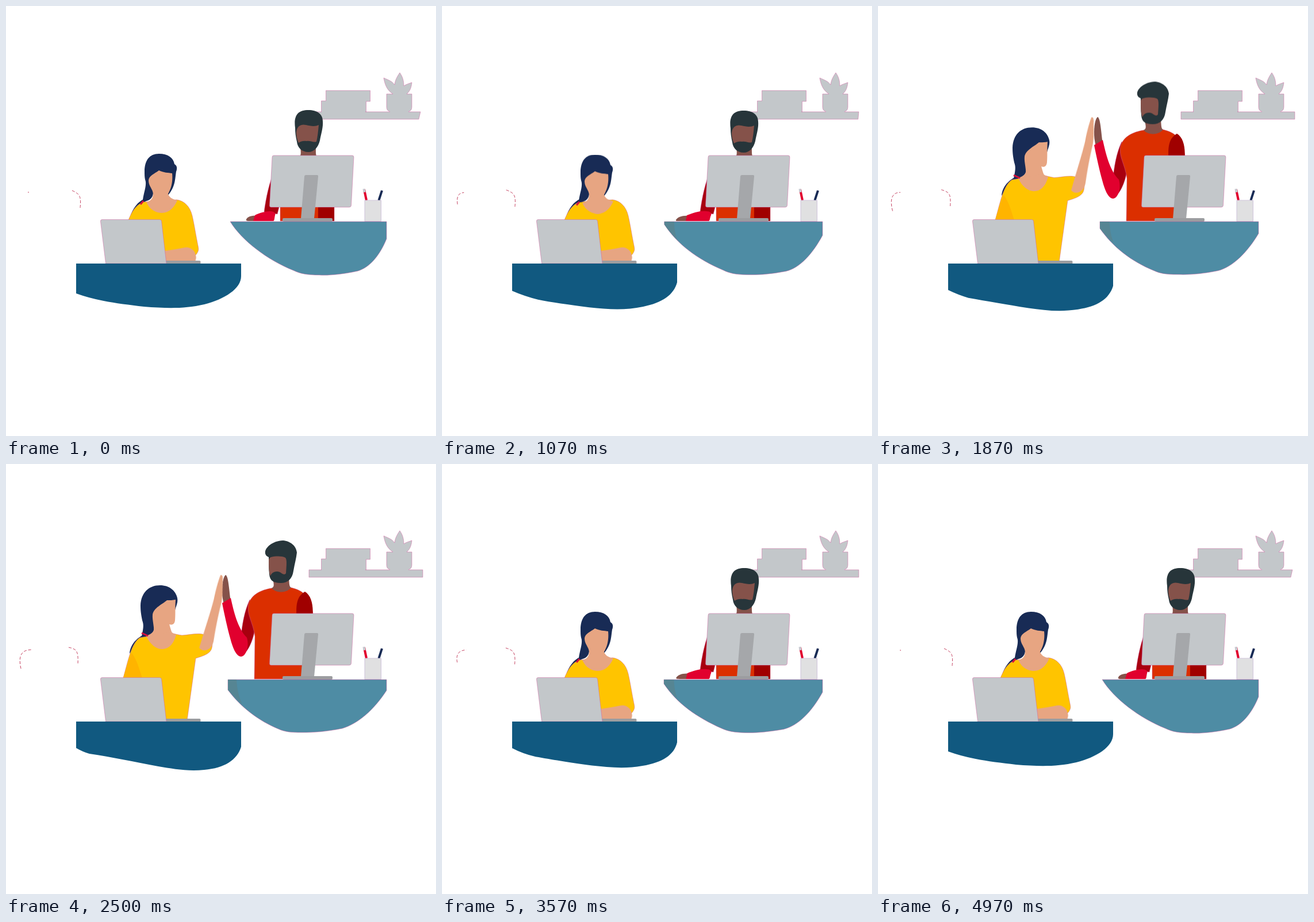
Write an HTML page that moves like this. It is 748 px wide and 748 px high and loops after 5010 ms.

```html
<!DOCTYPE html>
<html lang="en">
<head>
<meta charset="utf-8">
<title>High five at the desk</title>
<style>
html, body { margin: 0; width: 100%; height: 100%; overflow: hidden; background: #fff; }
svg { display: block; width: 100vw; height: 100vh; }

.grey { fill: #c3c7ca; }
.dark { fill: #9c9da0; }
.rim { stroke: #cf5f9f; stroke-width: .5; }
.dash { fill: none; stroke: #c4405f; stroke-width: 1; stroke-dasharray: 5 3; }
.skin { fill: #e7a582; }
.brown { fill: #85524a; }
.navy { fill: #182b55; }
.coal { fill: #27353a; }
.red { fill: #e1002e; }

/* Each shape carries its poses as --a (rest) to --f; the groups share one timeline. */
.blob path, .man path, .woman path { animation: 5010ms linear infinite; }
.blob path { animation-name: blob; }
.man path { animation-name: man; }
.woman path { animation-name: woman; }
#forearm { animation-name: forearm; }
#manHead { animation: manNod 5010ms ease-in-out infinite; }
#womanHead { animation: womanNod 5010ms ease-in-out infinite; }

@keyframes blob {
  0%, 99.2%, 100% { d: var(--a); }
  9.4% { d: var(--b); }
  29.3% { d: var(--c); }
  49.9% { d: var(--d); }
  62.5% { d: var(--e); }
  83.2% { d: var(--f); }
}
@keyframes man {
  0%, 99.2%, 100% { d: var(--a); }
  9.4% { d: var(--b, var(--a)); }
  21.8% { d: var(--b, var(--a)); animation-timing-function: ease-in; }
  29.3% { d: var(--c); animation-timing-function: ease-out; }
  37% { d: var(--d); }
  51% { d: var(--d); animation-timing-function: ease-in-out; }
  62.5% { d: var(--e, var(--a)); }
  72%, 83.2% { d: var(--b, var(--a)); }
}
@keyframes woman {
  0%, 71%, 100% { d: var(--a); }
  22.2% { d: var(--a); animation-timing-function: ease-in; }
  29.3% { d: var(--c); animation-timing-function: ease-out; }
  38% { d: var(--d); }
  52% { d: var(--d); animation-timing-function: ease-in; }
  62.5% { d: var(--e); animation-timing-function: ease-out; }
}
@keyframes forearm {
  0%, 71%, 100% { transform: translate(327px, 430px) rotate(-98deg) scale(1.2, .9); }
  22.2% { transform: translate(327px, 430px) rotate(-98deg) scale(1.2, .9); animation-timing-function: ease-in; }
  29.3% { transform: translate(344px, 378px) rotate(-72deg) scale(1.25, .8); animation-timing-function: ease-out; }
  38% { transform: translate(348px, 322px) rotate(11.5deg) scale(1, 1); }
  52% { transform: translate(348px, 322px) rotate(11.5deg) scale(1, 1); animation-timing-function: ease-in; }
  62.5% { transform: translate(342px, 382px) rotate(-57deg) scale(1.2, .78); animation-timing-function: ease-out; }
}
@keyframes manNod {
  0%, 29.3%, 49.9%, 67%, 99.2%, 100% { transform: none; }
  9.4%, 21.8% { transform: translate(-1px, 1px); }
  42% { transform: translateY(-2px); }
  62.5% { transform: translateY(-3px); }
}
@keyframes womanNod {
  0%, 29.3%, 71%, 99.2%, 100% { transform: none; }
  9.4%, 21.8% { transform: translateY(1.5px); }
  83.2% { transform: translateY(1px); }
}

#shelf {
  --a: path("M527 184 L721 184 L718 197 L527 197 Z");
  --b: path("M527 184 L725 184 L722 197 L527 197 Z");
  --c: path("M527 184 L725 184 L725 197 L527 197 Z");
  --d: var(--c); --e: var(--c); --f: var(--c);
}
#dashL {
  --a: path("M38 324 C39 324 39 324 40 324");
  --b: path("M30 327 C33 325 38 324 43 324");
  --c: path("M25 357 C19 335 24 325 35 325");
  --d: path("M26 356 C20 330 30 323 45 323");
  --e: path("M26 357 C19 332 27 324 43 323");
  --f: path("M27 329 C30 325 36 324 42 324");
}
#dashR {
  --a: path("M115 321 C128 327 131 330 129 351");
  --b: path("M113 320 C127 326 130 330 128 350");
  --c: path("M111 320 C125 325 128 328 126 350");
  --d: path("M109 319 C123 322 126 325 125 348");
  --e: path("M110 320 C124 323 127 327 126 349");
  --f: path("M112 320 C126 326 130 329 127 350");
}
#deskL {
  --a: path("M122 448 L409 448 L409 470 C409 492 380 510 345 519 C310 527 280 526 240 523 C215 520 190 517 170 513 Q144 508 122 500 Z");
  --b: path("M122 448 L409 448 L409 476 C405 496 385 512 350 520 C318 528 288 526 250 523 C215 519 190 516 170 512 Q144 507 122 498 Z");
  --c: path("M122 448 L409 448 L409 484 C402 507 382 519 350 525 C318 531 290 529 260 525 C222 520 190 515 165 510 Q144 504 122 494 Z");
  --d: path("M122 448 L409 448 L409 492 C402 515 380 529 345 532 C315 535 290 530 265 526 C222 518 185 510 145 504 Q134 501 122 494 Z");
  --e: path("M122 448 L409 448 L409 488 C403 511 382 523 348 528 C318 532 290 529 263 525 C222 519 190 513 158 508 Q138 503 122 493 Z");
  --f: path("M122 448 L409 448 L409 479 C405 500 385 514 350 521 C318 529 290 526 258 524 C215 519 190 515 170 511 Q145 506 122 496 Z");
}
#deskR {
  --a: path("M390 375 L662 375 L662 405 C650 435 632 455 612 461 C585 467 560 469 545 468 C525 468 512 466 500 460 C455 442 410 408 390 375 Z");
  --b: path("M388 375 L662 375 L662 402 C645 435 625 457 603 462 C575 467 552 468 538 468 C520 468 508 465 497 459 C450 438 408 410 388 375 Z");
  --c: path("M386 375 L662 375 L662 397 C645 428 620 456 595 461 C565 467 545 468 525 467 C505 467 495 465 484 460 C440 442 408 416 386 383 Z");
  --d: path("M386 375 L662 375 L662 394 C640 428 612 452 585 460 C555 466 535 467 515 467 C495 467 485 466 474 461 C440 447 408 423 386 393 Z");
  --e: path("M386 375 L662 375 L662 395 C642 428 616 455 590 461 C560 466 540 468 522 467 C502 467 492 465 481 460 C440 443 408 419 386 386 Z");
  --f: path("M386 375 L662 375 L662 400 C645 435 625 456 600 462 C572 467 550 468 535 468 C517 467 505 465 494 460 C448 438 408 412 386 377 Z");
}
#deskShade {
  --a: path("M390 375 L390 375 C390 375 390 375 390 375 C390 375 390 375 390 375 Z");
  --b: path("M388 375 L404 375 C404 386 405 394 409 404 C400 395 394 387 388 376 Z");
  --c: path("M386 375 L404 375 C404 388 406 400 410 409 C402 402 394 393 386 383 Z");
  --d: path("M386 375 L401 375 C402 392 405 405 411 418 C402 410 394 402 386 393 Z");
  --e: path("M386 375 L403 375 C404 390 406 402 410 412 C402 404 394 396 386 386 Z");
  --f: path("M386 375 L404 375 C404 386 405 394 409 404 C400 395 393 387 386 377 Z");
}

#manUpper {
  --a: path("M468 285 C458 305 452 335 449 358 L472 362 C478 340 482 310 482 290 Z");
  --c: path("M462 255 C446 275 438 300 434 325 L444 343 C452 330 462 310 466 290 Z");
  --d: path("M424 236 C415 255 410 280 408 310 L414 330 C424 322 432 300 434 280 Z");
}
#manBody {
  --a: path("M508 264 C490 266 474 272 470 285 C470 310 477 330 477 350 L477 374 L571 374 L571 290 C566 270 545 265 535 264 Z");
  --c: path("M498 240 C480 242 462 248 458 262 C458 290 466 320 467 340 L466 374 L554 374 L565 265 C558 246 545 242 533 240 Z");
  --d: path("M462 216 C444 219 428 226 422 243 C418 262 430 275 433 300 L432 374 L516 374 L534 262 C530 226 512 219 496 215 Z");
}
#manFarArm {
  --a: path("M560 270 C545 280 543 320 543 374 C543 374 571 374 571 374 C571 320 572 285 560 270 Z");
  --c: path("M553 246 C538 256 536 290 537 355 C542 368 550 367 554 360 C570 300 568 260 553 246 Z");
  --d: path("M520 222 C503 232 503 250 508 290 C512 300 525 300 530 290 C536 260 536 232 520 222 Z");
}
#manNeck {
  --a: path("M512 246 C514 260 512 262 508 264 C518 274 534 274 543 264 C538 262 539 254 539 244 Z");
  --c: path("M502 222 C504 236 502 238 498 240 C508 250 524 250 533 240 C528 238 530 232 530 220 Z");
  --d: path("M464 200 C467 212 466 214 462 216 C470 225 488 225 496 215 C492 213 493 206 492 198 Z");
}
#manHair {
  --a: path("M503 212 C500 190 508 181 526 181 C541 181 551 188 551 200 C552 212 548 222 546 234 C543 246 536 254 526 254 C514 254 507 246 506 236 C504 228 503 220 503 212 Z");
  --c: path("M492 188 C489 167 498 157 516 157 C532 157 542 165 542 178 C542 190 540 200 537 210 C533 223 526 230 515 230 C503 230 497 222 496 212 C494 204 493 196 492 188 Z");
  --d: path("M457 162 C442 156 456 134 482 133 C494 134 505 142 506 154 C505 164 502 174 500 186 C498 200 490 207 478 207 C464 207 459 202 458 192 C457 182 457 172 457 162 Z");
}
#manFace {
  --a: path("M505 220 C506 208 514 205 522 207 C530 209 538 210 544 207 C543 218 542 228 540 236 C534 238 530 234 523 235 C516 234 512 236 509 238 C506 232 505 226 505 220 Z");
  --c: path("M495 196 C496 186 504 181 511 183 C519 186 527 186 532 185 C532 196 531 204 528 213 C523 214 519 210 512 211 C506 211 502 213 498 216 C496 209 495 202 495 196 Z");
  --d: path("M457 166 C458 164 459 163 461 162 C470 160 480 160 486 163 C489 166 488 176 487 190 C483 196 478 186 471 187 C465 187 461 191 460 195 C457 188 457 176 457 166 Z");
}
#manHand {
  --a: path("M438 374 L438 365 C426 364 420 367 418 371 C417 374 420 374 424 374 Z");
  --b: path("M432 374 L430 365 C418 364 410 367 407 372 C406 374 408 374 412 374 Z");
  --c: path("M398 314 L406 302 C397 289 386 283 382 283 C377 285 379 291 383 296 Z");
  --d: path("M379 246 L391 240 C388 218 387 195 382 193 C376 198 375 220 377 234 Z");
  --e: path("M432 374 L434 362 C426 359 416 362 414 367 C414 372 418 374 424 374 Z");
}
#manForearm {
  --a: path("M430 374 L433 364 C440 360 452 357 459 357 C466 357 470 360 468 364 C467 368 467 374 465 374 C455 374 440 374 430 374 Z");
  --b: path("M424 374 L426 364 C440 359 448 356 460 357 C466 357 470 360 468 364 C466 368 466 374 464 374 C450 374 436 374 424 374 Z");
  --c: path("M395 311 L404 299 C414 308 422 317 433 323 C445 326 447 340 440 347 C433 353 427 348 420 341 C411 332 402 322 395 311 Z");
  --d: path("M376 242 L391 233 C396 256 403 286 419 302 C424 320 416 335 409 335 C400 335 394 318 390 303 C385 285 380 262 376 242 Z");
}

#tail {
  --a: path("M240 336 C230 340 220 352 216 367 C228 352 238 345 244 338 Z");
  --c: path("M242 320 C228 326 214 338 214 357 C222 346 234 332 246 326 Z");
  --d: path("M250 294 C232 297 216 312 215 330 C222 318 236 306 254 300 Z");
  --e: path("M242 322 C235 330 230 340 228 348 C235 342 240 336 246 326 Z");
}
#womanBody {
  --a: path("M238 341 C224 348 219 358 213 372 L213 446 L312 446 L312 443 C322 440 331 435 334 427 C336 423 334 418 333 412 C329 391 327 378 324 365 C320 348 310 339 297 337 Z");
  --c: path("M236 324 C222 328 216 348 210 372 L210 446 L318 446 L321 394 C328 399 341 397 350 382 C351 376 350 368 347 364 C342 360 331 353 325 349 C320 334 310 324 297 322 Z");
  --d: path("M233 302 C218 312 213 340 204 372 L204 446 L315 446 L330 338 C343 334 356 330 358 320 C360 312 358 308 354 304 C345 290 325 297 306 298 C300 297 293 296 286 293 Z");
  --e: path("M244 324 C222 328 214 352 207 372 L207 446 L318 446 L322 399 C331 402 343 396 348 388 C350 380 349 376 347 372 C342 366 332 358 326 351 C322 334 310 324 297 322 Z");
}
#sleeveShade {
  --a: path("M222 355 C219 360 216 366 214 372 L214 372 C216 366 219 360 222 355 Z");
  --c: path("M221 340 C215 350 212 360 210 372 L227 372 C226 362 224 350 221 340 Z");
  --d: path("M218 328 C213 345 208 358 204 372 L237 372 C232 358 228 340 218 328 Z");
  --e: path("M221 342 C215 352 211 362 207 372 L229 372 C227 362 225 351 221 342 Z");
}
#womanNeck {
  --a: path("M256 324 C256 338 250 339 244 341 C250 355 262 360 271 360 C284 360 293 350 298 338 C289 336 283 333 281 324 Z");
  --c: path("M253 304 C254 318 246 321 238 324 C246 338 260 344 271 344 C284 342 293 334 298 322 C288 320 284 317 282 304 Z");
  --d: path("M258 280 C259 293 252 296 244 299 C250 314 262 322 271 322 C284 322 292 312 296 297 C288 295 286 290 284 279 Z");
  --e: path("M257 304 C258 318 252 322 243 325 C250 340 262 345 271 345 C284 343 293 334 298 322 C289 320 286 317 283 304 Z");
}
#womanHair {
  --a: path("M241 288 C241 268 250 257 266 257 C282 257 291 264 293 275 C298 278 298 283 296 288 C294 300 295 315 281 330 L256 322 C257 332 251 340 238 340 C238 328 246 312 242 302 C241 298 241 293 241 288 Z");
  --c: path("M236 270 C236 250 246 239 263 239 C281 239 290 246 292 257 C296 260 295 265 294 268 C293 280 291 298 282 309 L252 305 C253 318 248 323 236 324 C240 310 236 295 237 285 C236 280 236 275 236 270 Z");
  --d: path("M234 246 C235 224 248 211 268 211 C284 211 295 220 298 233 C299 238 298 242 296 248 C295 250 295 252 294 254 L257 275 C259 290 259 297 236 300 C239 285 240 280 237 272 C235 262 234 256 234 246 Z");
  --e: path("M235 272 C235 252 248 242 265 242 C284 242 293 250 295 260 C297 264 296 268 295 271 C294 275 292 280 290 285 L257 305 C259 318 255 324 237 326 C240 310 238 300 237 290 C236 284 235 278 235 272 Z");
}
#womanFace {
  --a: path("M248 303 C249 295 258 292 266 286 C274 290 282 290 289 291 C290 300 289 310 286 318 C284 323 282 327 280 329 L281 334 L256 334 C258 318 248 316 248 303 Z");
  --c: path("M247 291 C248 283 258 276 268 265 C275 269 282 270 288 269 C289 280 288 290 286 296 C284 302 282 306 280 308 L283 320 L254 320 C255 305 246 303 247 291 Z");
  --d: path("M255 262 C257 250 272 244 280 237 C285 237 290 237 295 236 C294 250 295 260 294 272 C293 280 288 280 284 279 L288 292 L257 298 C259 285 254 272 255 262 Z");
  --e: path("M252 296 C254 286 268 280 277 268 C283 271 287 271 293 271 C292 283 293 293 291 300 C290 308 287 311 283 311 L286 320 L257 320 C258 308 252 304 252 296 Z");
}
#band {
  --a: path("M234 345 L239 339");
  --c: path("M234 322 L242 325");
  --d: path("M236 294 L247 299");
  --e: path("M240 322 L240 322");
}
</style>
</head>
<body>
<svg viewBox="0 0 748 748">
  <g class="blob">
    <path id="dashL" class="dash"/>
    <path id="dashR" class="dash"/>
    <path id="shelf" class="grey rim"/>
  </g>
  <path class="grey rim" d="M556.500 147H633.500V166H626.500V184H548.500V165H556.500Z"/>
  <path class="grey rim" d="M673 153C662 146 659 136 657 125C666 129 672 131 676 137C677 128 681 122 685 116C690 123 692 130 692 139C696 136 701 135 706 133C705 143 702 149 697 153H706V176Q706 184 696 184H672Q662 184 662 176V153Z"/>
  <path class="grey" d="M549 183h76v3h-76zM668 183h32v3h-32z"/>

  <g class="man">
    <path id="manUpper" class="rim" fill="#a8000f"/>
    <path id="manBody" class="rim" fill="#db2f00"/>
    <path id="manFarArm" fill="#a00000"/>
    <path id="manNeck" class="brown"/>
    <g id="manHead">
      <path id="manHair" class="coal"/>
      <path id="manFace" class="brown"/>
    </g>
    <path id="manHand" class="brown"/>
    <path id="manForearm" class="red"/>
  </g>

  <path class="grey rim" d="M466 260H602Q605 260 605 263L600.500 347Q600 350 597 350H461Q458 350 458.500 346L463 263Q463 260 466 260Z"/>
  <path fill="#a5a7aa" d="M522 294H541Q543.500 294 543 297L536 370H513L519 297Q519 294 522 294Z"/>
  <rect class="dark" x="481" y="369" width="87" height="6" rx="2"/>
  <path d="M623 319L627 338" stroke="#e1002e" stroke-width="4"/>
  <path d="M622.500 318L623.500 324" stroke="#c9cbd2" stroke-width="4"/>
  <path d="M654 321L648.500 338" stroke="#182b55" stroke-width="4"/>
  <rect x="624" y="338" width="28.500" height="36.500" fill="#e0e0e1" stroke="#c9b9d6" stroke-width=".8"/>

  <g class="blob">
    <path id="deskR" class="rim" fill="#4e8ca4"/>
    <path id="deskShade" fill="#568593"/>
  </g>

  <g class="woman">
    <path id="tail" class="navy"/>
    <path id="womanBody" class="rim" fill="#ffc400"/>
    <path id="sleeveShade" fill="#ffb400"/>
    <g id="womanHead">
      <path id="womanHair" class="navy"/>
      <path id="womanNeck" class="skin"/>
      <path id="womanFace" class="skin"/>
      <path id="band" stroke="#d5103f" stroke-width="3"/>
    </g>
    <path id="forearm" class="skin" d="M-12 0C-9 -35 -5 -65 -4 -88C-4 -105 -3 -120 -1 -131C3 -133 4 -127 5 -120C8 -105 10 -95 10 -86C9 -60 9 -40 10 -17C11 0 -4 8 -12 0Z"/>
  </g>

  <rect class="dark" x="270" y="443" width="68.500" height="6" rx="2"/>
  <path class="grey rim" d="M167 371.500H267Q270 371.500 270.500 374L279 448H173.500L164.500 375Q164 371.500 167 371.500Z"/>
  <g class="blob"><path id="deskL" fill="#115980"/></g>
</svg>
</body>
</html>
```
